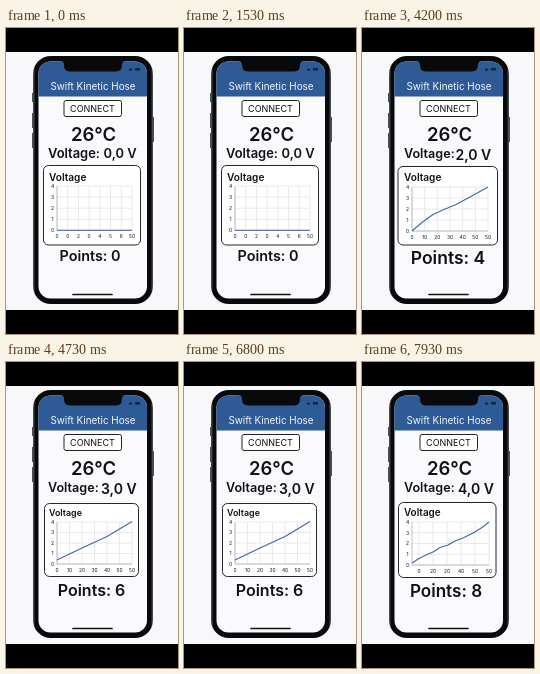
These frames come from a looping animation (172 px wide and 306 px high, 8000 ms). An HTML page:

```html
<!DOCTYPE html>
<html lang="en">
<head>
<meta charset="utf-8">
<title>Sock voltage app</title>
<style>
  html, body { margin: 0; height: 100%; overflow: hidden; background: #000; }
  svg { display: block; width: 100%; height: 100%; }
  text { font-family: Inter, Roboto, sans-serif; fill: #101114; white-space: pre; }
  .bold { font-weight: 600; }
  .mid { text-anchor: middle; }
</style>
</head>
<body>
<svg viewBox="0 0 172 306">
  <defs>
    <linearGradient id="bezel">
      <stop offset="0" stop-color="#555a60"/>
      <stop offset=".02" stop-color="#08090b"/>
      <stop offset=".98" stop-color="#08090b"/>
      <stop offset="1" stop-color="#555a60"/>
    </linearGradient>
    <clipPath id="screen"><rect x="32.5" y="33.5" width="108.5" height="237" rx="12"/></clipPath>
  </defs>
  <rect width="172" height="306"/>
  <rect y="24" width="172" height="258" fill="#f8f8fa"/>
  <path d="M27 65v9M27 85v15M27 105v15M147 89v25" stroke="#24272b" stroke-width="1.6"/>
  <rect x="27" y="28" width="120" height="248" rx="18" fill="url(#bezel)"/>
  <g clip-path="url(#screen)">
    <rect x="32" y="33" width="110" height="238" fill="#fafafc"/>
    <rect x="32" y="33" width="110" height="35.5" fill="#2e5b96"/>
  </g>
  <path d="M54 33q4 0 4 4q0 6.5 6 6.5h46q6 0 6-6.5q0-4 4-4z" fill="#08090b"/>
  <path d="M122.5 41.2q2-1.6 4 0l-2 2z" fill="#14243c"/>
  <rect x="129" y="40" width="5" height="2.6" rx=".7" fill="#14243c"/>
  <text class="mid" x="87" y="61.5" font-size="9.9" style="fill:#f4f7fb">Swift Kinetic Hose</text>
  <rect x="58" y="72.5" width="57.5" height="16" rx="2" fill="#fff" stroke="#222"/>
  <text class="mid" x="86.5" y="83.8" font-size="9">CONNECT</text>
  <text class="bold mid" x="87.5" y="113" font-size="18.5">26°C</text>
  <g id="readings"></g>
  <path d="M67 266.5h39" stroke="#111" stroke-width="1.7" stroke-linecap="round"/>
</svg>
<script>
const LOOP = 8000;
const tens = [0, 10, 20, 30, 40, 50, 50];

// box and grid: left, top, right, bottom; label and value: x, baseline, size
const states = [
  { start: 0, volts: "0,0 V", points: 0, label: [42, 130, 12.9], value: [97.5, 130, 12.9],
    box: [37.5, 137.5, 134.5, 217], title: [43, 152.5, 10.1], grid: [51, 158, 126, 202.5],
    ticks: [0, 0, 2, 0, 4, 5, 6, 50], firstTick: 51, score: [84, 232.5, 14.4],
    line: [[51, 202.3], [126, 202.3]] },
  { start: 2200, volts: "2,0 V", points: 4, label: [42, 130, 12.6], value: [93.5, 132, 14],
    box: [36, 138.5, 135.5, 217], title: [42, 153, 10.1], grid: [50, 159, 126, 203],
    ticks: tens, firstTick: 50, score: [86, 235.5, 17.5],
    line: [[50, 203], [60, 194.5], [71, 186.5], [82, 181.5], [94, 176.5], [108, 169], [126, 159]] },
  { start: 4730, volts: "3,0 V", points: 6, label: [42, 130, 12.6], value: [95, 131.5, 14],
    box: [38.5, 141.5, 132.5, 214.5], title: [43, 154, 8.9], grid: [51, 160, 126, 202],
    ticks: tens, firstTick: 51, score: [85.5, 234, 16],
    line: [[51, 198], [76, 186], [101, 174.5], [126, 159.5]] },
  { start: 7800, volts: "4,0 V", points: 8, label: [42, 130, 12.6], value: [96, 131.5, 14],
    box: [36.5, 140.5, 134, 215.5], title: [42, 153.5, 9.9], grid: [50, 160, 127, 203],
    ticks: [0, 20, 20, 40, 50, 50], firstTick: 57, score: [84, 235, 17.1],
    line: [[50, 201], [57, 196.5], [65, 192.5], [71, 190], [78, 185.5], [86, 183],
           [93, 179], [101, 176], [112, 170.5], [120, 165.5], [127, 160]] }
];

const text = ([x, y, size], content, classes = "bold") =>
  `<text x="${x}" y="${y}" font-size="${size}" class="${classes}">${content}</text>`;

function chart({ box, title, grid, ticks, firstTick, line }) {
  const [left, top, right, bottom] = grid;
  const tickX = i => firstTick + (right - firstTick) * i / (ticks.length - 1);
  let lines = "", labels = "";
  for (let i = 0; i <= 4; i++) {
    const y = bottom - (bottom - top) * i / 4;
    lines += `M${left} ${y}H${right}`;
    labels += text([left - 4.5, y + 1.8, 5], i, "mid");
  }
  ticks.forEach((tick, i) => {
    lines += `M${tickX(i)} ${top}V${bottom}`;
    labels += text([tickX(i), bottom + 7.5, 4.9], tick, "mid");
  });
  return `<rect x="${box[0]}" y="${box[1]}" width="${box[2] - box[0]}" height="${box[3] - box[1]}"
      rx="5" fill="#fff" stroke="#24262a"/>
    ${text(title, "Voltage")}
    <path d="${lines}" stroke="#d9dbe0" stroke-width=".6"/>
    <path d="M${left} ${top}V${bottom}H${right}" fill="none" stroke="#999da5" stroke-width=".6"/>
    ${labels}
    <polyline points="${line.join(" ")}" fill="none" stroke="#3c69a8" stroke-width="1.1" stroke-linejoin="round"/>`;
}

const render = state => text(state.label, "Voltage:") + text(state.value, state.volts) +
  chart(state) + text(state.score, `Points: ${state.points}`, "bold mid");

const readings = document.getElementById("readings");
const origin = performance.now();
let shown;

function draw() {
  const time = Math.max(0, performance.now() - origin) % LOOP;
  const state = states.filter(s => s.start <= time).pop();
  if (state !== shown) readings.innerHTML = render(shown = state);
  requestAnimationFrame(draw);
}
draw();
</script>
</body>
</html>
```
